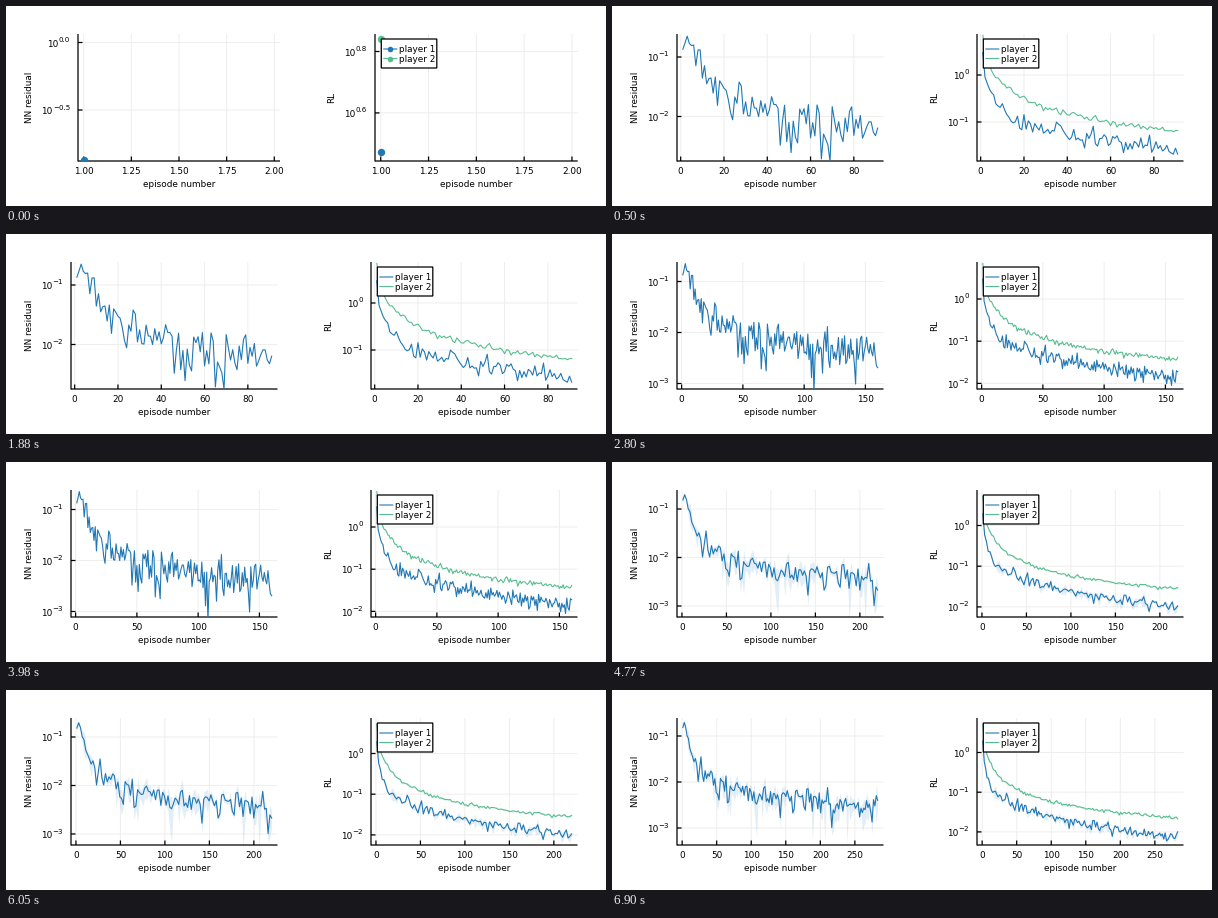
A matplotlib script that plays this animation: 600x200 px, repeating every 8 s.

```python
import matplotlib.pyplot as plt
import numpy as np
from matplotlib.animation import FuncAnimation
from matplotlib.patches import Rectangle

DPI, PX = 100, 0.72  # PX: points per pixel
BLUE, GREEN = "#1f77b4", "#56bd90"
TOP, BOTTOM = 28, 155
STEP, LOOP = 50, 8000
STARTS = [0, 500, 2800, 4750, 6900]
FONT, POWER_SCALE = 8.9, 0.8

plt.rcParams["font.family"] = "DejaVu Sans"
rng = np.random.default_rng(21)
episodes = np.arange(1, 284)


def learning_curve(trend, shape):
    """Log10 values along a few (episode, level) points with gamma noise."""
    knots, levels = zip(*trend)
    noise = np.log10(rng.gamma(shape, 1 / shape, len(episodes)))
    noise -= noise.mean()
    fade_in = np.minimum(1, (episodes - 1) / 15)
    return np.interp(np.log(episodes), np.log(knots), levels) + noise * fade_in


residual = learning_curve([(1, -.87), (3, -.65), (6, -.85), (10, -1.2), (20, -1.6),
                           (50, -2.05), (91, -2.22), (160, -2.42), (283, -2.65)], 3.5)
player1 = learning_curve([(1, .474), (2, -.06), (4, -.25), (10, -.72), (14, -.95),
                          (20, -1.0), (40, -1.25), (91, -1.6), (160, -1.85),
                          (283, -2.12)], 18)
player2 = learning_curve([(1, .842), (5, .1), (10, -.18), (20, -.49), (40, -.81),
                          (91, -1.19), (160, -1.43), (283, -1.66)], 150)


class Panel:
    """One plot drawn in stage pixels with a logarithmic y axis."""

    def __init__(self, ax, left, right, x_range, y_ref, decade):
        self.ax, self.left, self.right = ax, left, right
        self.x_range, self.y_ref, self.decade = x_range, y_ref, decade
        self.clip = Rectangle((left, TOP), right - left, BOTTOM - TOP,
                              transform=ax.transData)

    def x(self, value):
        low, high = self.x_range
        return self.left + (value - low) / (high - low) * (self.right - self.left)

    def y(self, log_value):
        level, height = self.y_ref
        return height + (level - log_value) * self.decade

    def segment(self, xs, ys, color="black", width=1.25, z=3):
        self.ax.plot(xs, ys, color=color, lw=width * PX, zorder=z,
                     solid_capstyle="butt", snap=False)

    def text(self, x, y, label, size=FONT, **kw):
        kw = {"ha": "center", "va": "baseline", "zorder": 8, **kw}
        self.ax.text(x, y, label, fontsize=size * PX, **kw)

    def power_label(self, y, power):
        power_size, edge = FONT * POWER_SCALE, self.left - 8
        ems = {"\u2212": 0.838, ".": 0.318}
        width = sum(ems.get(c, 0.636) for c in power) * power_size
        self.text(edge, y - 0.5, power, power_size, ha="right")
        self.text(edge - width, y + 4.2, "10", ha="right")

    def frame(self, x_ticks, y_ticks, y_label, label_x, x_format, y_format):
        for tick in x_ticks:
            x = self.x(tick)
            self.segment([x, x], [TOP, BOTTOM], "#eeeeee", 1, 0)
            self.segment([x, x], [BOTTOM, BOTTOM - 4.5])
            self.text(x, 167.5, format(tick, x_format))
        for tick in y_ticks:
            y = self.y(tick)
            self.segment([self.left, self.right], [y, y], "#eeeeee", 1, 0)
            self.segment([self.left, self.left + 4.5], [y, y])
            self.power_label(y, format(tick, y_format).replace("-", "\u2212"))
        self.segment([self.left, self.left], [TOP, BOTTOM + 0.5])
        self.segment([self.left, self.right], [BOTTOM, BOTTOM])
        self.text((self.left + self.right) / 2, 181, "episode number")
        self.text(label_x, 91.5, y_label, rotation=90, va="center")

    def curve(self, xs, logs, color, marker=None):
        line, = self.ax.plot(self.x(xs), self.y(logs), color=color, lw=1.1 * PX,
                             marker=marker, ms=7.4 * PX, mew=0, zorder=4)
        line.set_clip_path(self.clip)

    def band(self, xs, low, high, color):
        area = self.ax.fill_between(self.x(xs), self.y(low), self.y(high),
                                    color=color, alpha=0.13, lw=0, zorder=2)
        area.set_clip_path(self.clip)

    def series(self, logs, count, color, averaged):
        if not averaged:
            self.curve(episodes[:count], logs[:count], color)
            return
        pairs = logs[:count // 2 * 2].reshape(-1, 2)
        xs = np.linspace(1, count, len(pairs))
        self.band(xs, pairs.min(1), pairs.max(1), color)
        self.curve(xs, np.log10((10 ** pairs).mean(1)), color)

    def legend(self, x, marker=None):
        self.ax.add_patch(Rectangle((x, 33), 55.5, 29, fc="white", ec="black",
                                    lw=1.25 * PX, zorder=6, snap=False))
        for name, color, y in (("player 1", BLUE, 43), ("player 2", GREEN, 52.5)):
            self.segment([x + 2, x + 16], [y, y], color, 1.1, 7)
            if marker:
                self.ax.plot(x + 9, y, marker, color=color, ms=5.6 * PX, mew=0, zorder=7)
            self.text(x + 17.7, y + 3.2, name, ha="left")


def stage():
    ax = fig.add_axes([0, 0, 1, 1])
    ax.set(xlim=(0, 600), ylim=(200, 0))
    ax.axis("off")
    return ax


def first_scene():
    ax, ticks, span = stage(), np.linspace(1, 2, 5), (0.97, 2.03)
    nn = Panel(ax, 72, 274, span, (0, 36.5), 135)
    nn.frame(ticks, [0, -0.5], "NN residual", 23, ".2f", ".1f")
    nn.curve(episodes[:1], residual[:1], BLUE, "o")
    rl = Panel(ax, 369, 571.7, span, (0.8, 45.5), 307)
    rl.frame(ticks, [0.8, 0.6], "RL", 325.5, ".2f", ".1f")
    rl.curve(episodes[:1], player1[:1], BLUE, "o")
    rl.curve(episodes[:1], player2[:1], GREEN, "o")
    rl.legend(375.3, "o")
    return ax


def scene(count, x_step, nn_scale, nn_ticks, rl_scale, rl_ticks, averaged=False):
    ax, pad = stage(), 0.03 * (count - 1)
    span, ticks = (1 - pad, count + pad), range(0, count, x_step)
    nn = Panel(ax, 65, 271.5, span, (-1, nn_scale[0]), nn_scale[1])
    nn.frame(ticks, nn_ticks, "NN residual", 23, "d", "d")
    nn.series(residual, count, BLUE, averaged)
    rl = Panel(ax, 365, 571.5, span, (0, rl_scale[0]), rl_scale[1])
    rl.frame(ticks, rl_ticks, "RL", 323, "d", "d")
    rl.series(player1, count, BLUE, averaged)
    rl.series(player2, count, GREEN, averaged)
    rl.legend(371.3)
    return ax


fig = plt.figure(figsize=(6, 2), dpi=DPI, facecolor="white")
scenes = [
    first_scene(),
    scene(91, 20, (51, 59.5), [-1, -2], (69, 47), [0, -1]),
    scene(160, 50, (47.5, 51), [-1, -2, -3], (65, 42.2), [0, -1, -2]),
    scene(220, 50, (47, 48.5), [-1, -2, -3], (63.5, 40.7), [0, -1, -2], True),
    scene(283, 50, (46, 46), [-1, -2, -3], (62.5, 39.7), [0, -1, -2], True),
]


def update(frame):
    current = np.searchsorted(STARTS, frame * STEP, side="right") - 1
    for index, ax in enumerate(scenes):
        ax.set_visible(index == current)
    return scenes


animation = FuncAnimation(fig, update, frames=LOOP // STEP, interval=STEP,
                          init_func=lambda: update(0), repeat=True, repeat_delay=0)
plt.show()
```
